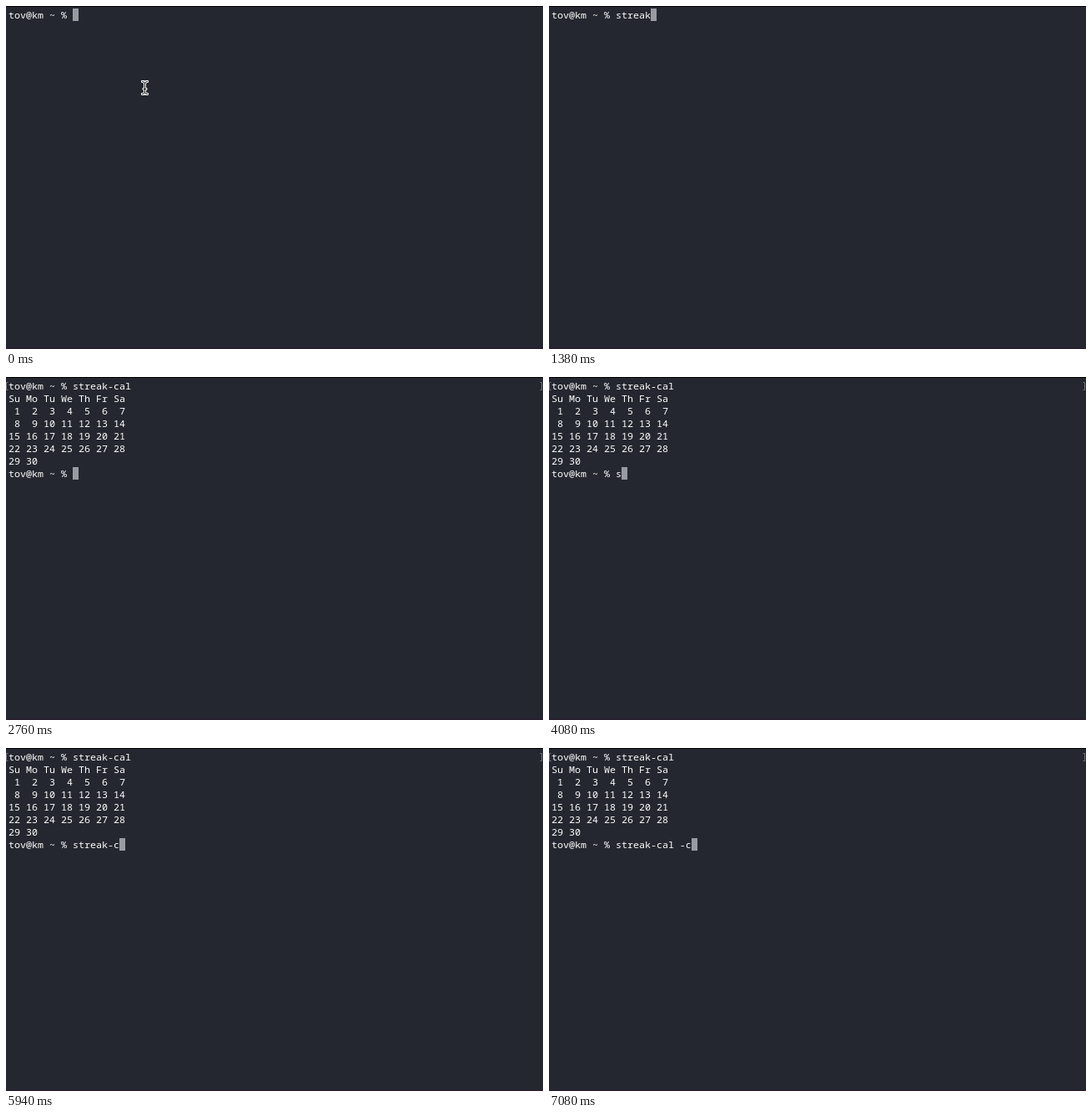
Write an HTML page that moves like this. It is 644 px wide and 411 px high and loops after 8 s.

```html
<!DOCTYPE html>
<html lang="en">
<head>
<meta charset="utf-8">
<title>Terminal</title>
<style>
html, body { margin: 0; width: 100%; height: 100%; overflow: hidden; background: #24272f; }
svg { display: block; }
text { font: 500 11.667px "Noto Sans Mono", "DejaVu Sans Mono", monospace; fill: #fff; white-space: pre; }
</style>
</head>
<body>
<svg width="644" height="411" viewBox="0 0 644 411">
  <rect width="644" height="411" fill="#24272f"/>
  <rect width="644" height="1" fill="#050507"/>
  <rect y="409" width="644" height="2" fill="#2a1f31"/>
  <rect id="caret" width="7" height="15" fill="#989ba1"/>
  <g id="lines"></g>
  <path id="marks" d="M2.5 6.5H.5V15.5H2.5M640.5 6.5H642.5V15.5H640.5" fill="none" stroke="#74767c"/>
  <g id="pointer" fill="none" stroke-linecap="round">
    <path id="beam" d="M163.5 90.5Q166.5 90.5 166.5 93V103Q166.5 105.5 163.5 105.5M169.5 90.5Q166.5 90.5 166.5 93V103Q166.5 105.5 169.5 105.5M165 99.5H168" stroke="#fff" stroke-width="2.8"/>
    <use href="#beam"/>
    <path d="M163.5 90.5Q166.5 90.5 166.5 93V103Q166.5 105.5 163.5 105.5M169.5 90.5Q166.5 90.5 166.5 93V103Q166.5 105.5 169.5 105.5M165 99.5H168" stroke="#15171c"/>
  </g>
</svg>
<script>
const LOOP = 8000, CELL = 7, ROW = 15, LEFT = 3, TOP = 3;
const ENTER = 2460, OUTPUT = 2760;
const PROMPT = 'tov@km ~ % ';
const first = { text: 'streak-cal', keys: [120, 540, 720, 900, 1200, 1380, 1740, 1920, 2100, 2220] };
const second = { text: 'streak-cal -c', keys: [4080, 4440, 4620, 4800, 5040, 5220, 5700, 5940, 6120, 6240, 6540, 6900, 7080] };

const calendar = ['Su Mo Tu We Th Fr Sa'];
for (let day = 1; day <= 30; day += 7) {
  const week = [];
  for (let d = day; d < day + 7 && d <= 30; d++) week.push(String(d).padStart(2));
  calendar.push(week.join(' '));
}

const el = id => document.getElementById(id);
const show = (id, on) => el(id).setAttribute('visibility', on ? 'visible' : 'hidden');
const rows = Array.from({ length: 8 }, (_, i) => {
  const row = document.createElementNS('http://www.w3.org/2000/svg', 'text');
  row.setAttribute('x', LEFT);
  row.setAttribute('y', TOP + ROW * i + 12);
  return el('lines').appendChild(row);
});

const typed = (cmd, t) => PROMPT + cmd.text.slice(0, cmd.keys.filter(k => k <= t).length);

function screen(t) {
  const lines = [typed(first, t)];
  if (t >= OUTPUT) lines.push(...calendar, typed(second, t));
  else if (t >= ENTER) lines.push('');
  return lines;
}

function draw(now) {
  const t = now % LOOP;
  const lines = screen(t);
  const last = lines.length - 1;
  rows.forEach((row, i) => {
    const text = lines[i] || '';
    if (row.textContent !== text) row.textContent = text;
  });
  el('caret').setAttribute('x', LEFT + CELL * lines[last].length);
  el('caret').setAttribute('y', TOP + ROW * last);
  show('marks', t >= ENTER);
  show('pointer', t < first.keys[0]);
}

const start = performance.now();
function tick() {
  draw(performance.now() - start);
  requestAnimationFrame(tick);
}
tick();
</script>
</body>
</html>
```
